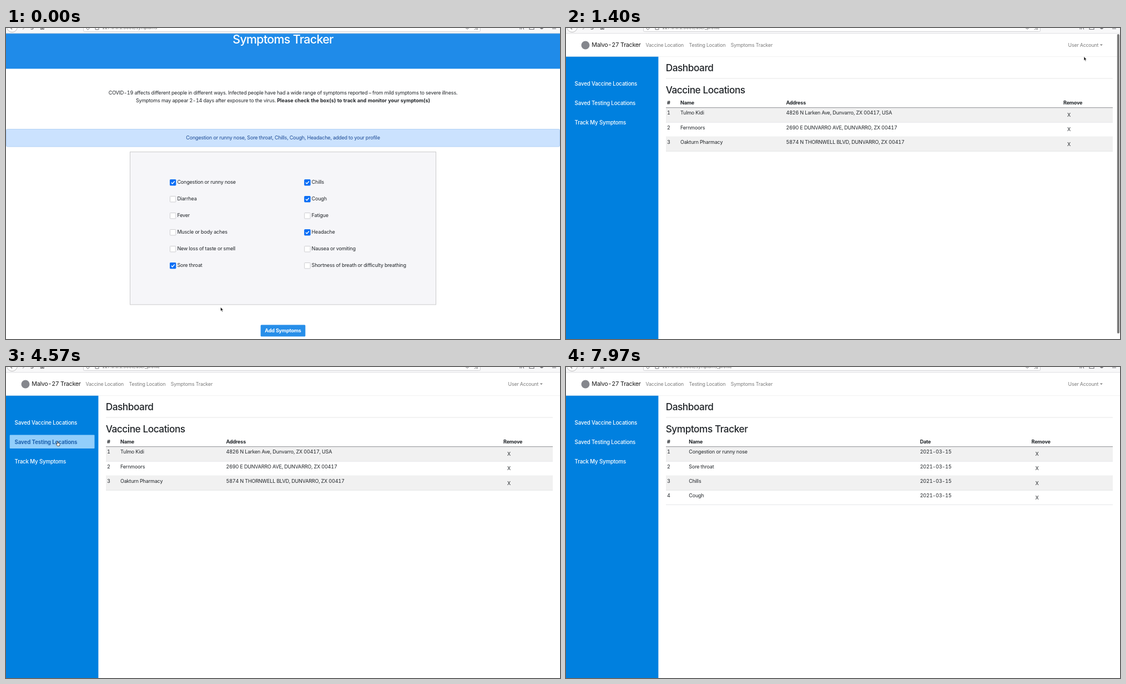
These frames come from a looping animation (998 by 561 pixels, 8640 ms). An HTML page:

```html
<!DOCTYPE html>
<html lang="en">
<head>
<meta charset="utf-8">
<title>Symptoms Tracker</title>
<style>
html, body { margin: 0; width: 100%; height: 100%; overflow: hidden; background: #fff; }
svg { display: block; width: 998px; height: 561px; }
text {
  font: 400 9px Inter, "Open Sans", sans-serif;
  font-optical-sizing: none;
  font-variant-numeric: tabular-nums;
  letter-spacing: -.019em;
  fill: #212529;
  white-space: pre;
}
.bold { font-weight: 700; }
tspan.bold { letter-spacing: 0; }
.mid { text-anchor: middle; }
.nav { font-size: 8.8px; fill: #7b7b7b; }
.brand { font-size: 10.8px; letter-spacing: -.03em; fill: #1b1b1b; }
.title { font-size: 21.4px; font-weight: 500; letter-spacing: -.032em; fill: #fff; }
.head { font-size: 17.3px; font-weight: 500; letter-spacing: -.028em; }
.side { font-size: 9.75px; font-weight: 500; fill: #fff; }
.soft .side { font-weight: 700; fill: #d5e8fa; }
.full .side { font-weight: 700; fill: #1d62b0; }
.row rect { fill: none; }
.soft rect { fill: #3195e6; }
.full rect { fill: #92cefb; }
.note { fill: #1b4a94; }
.white { fill: #fff; }
.url { font-size: 8px; fill: #666; }
</style>
</head>
<body>
<svg id="stage" viewBox="0 0 998 561"></svg>
<script>
const LOOP = 8640;
const stage = document.getElementById("stage");

function add(parent, tag, attrs, content) {
  const el = document.createElementNS("http://www.w3.org/2000/svg", tag);
  for (const k in attrs) el.setAttribute(k, attrs[k]);
  if (content) el.textContent = content;
  parent.append(el);
  return el;
}
const group = parent => add(parent, "g", {});
const rect = (p, x, y, width, height, fill, more) =>
  add(p, "rect", { x, y, width, height, fill, ...more });
const label = (p, x, y, str, cls = "") => add(p, "text", { x, y, class: cls }, str);
const line = (p, d, stroke, width = 1) =>
  add(p, "path", { d, stroke, "stroke-width": width, fill: "none" });
const show = (el, on) => { el.style.display = on ? "" : "none"; };

// Symptoms form
const form = group(stage);
rect(form, 0, 51, 998, 103.5, "#1f8be9");
label(form, 499, 109.2, "Symptoms Tracker", "title mid");
label(form, 499, 201.2, "COVID-19 affects different people in different ways. Infected people have had a wide range of symptoms reported – from mild symptoms to severe illness.", "mid");
const second = label(form, 499, 214.6, "Symptoms may appear 2-14 days after exposure to the virus. ", "mid");
add(second, "tspan", { class: "bold" }, "Please check the box(s) to track and monitor your symptom(s)");

const alertBox = group(form);
rect(alertBox, 0.5, 263.5, 997, 31.5, "#cbe2fe", { stroke: "#b3d2f5", rx: 2 });
label(alertBox, 499, 282.4, "Congestion or runny nose, Sore throat, Chills, Cough, Headache, added to your profile", "note mid");

const card = group(form);
rect(card, 223.5, 263.5, 551, 275.5, "#f6f6f9", { stroke: "#cacacc" });
const symptoms = [
  ["Congestion or runny nose", 1], ["Diarrhea"], ["Fever"], ["Muscle or body aches"],
  ["New loss of taste or smell"], ["Sore throat", 1],
  ["Chills", 1], ["Cough", 1], ["Fatigue"], ["Headache", 1],
  ["Nausea or vomiting"], ["Shortness of breath or difficulty breathing"]
];
symptoms.forEach(([name, on], i) => {
  const x = i < 6 ? 295 : 537.2, y = 313 + (i % 6) * 30;
  rect(card, x + .5, y + .5, 10.4, 10.4, on ? "#0d6ff5" : "#fff",
    { stroke: on ? "#0d6ff5" : "#cdcdd0", rx: .8 });
  if (on) line(card, `M${x + 2.8} ${y + 5.8}l2 2.1 3.9-4.4`, "#fff", 1.4);
  label(card, x + 13.4, y + 8, name);
});
rect(card, 458.7, 575.5, 80.6, 21, "#278ee9", { rx: 1.5 });
label(card, 499, 589.2, "Add Symptoms", "bold white mid");

// Dashboard
const dash = group(stage);
rect(dash, 0, 51.6, 166.4, 510, "#0080df");
label(dash, 179.7, 77.8, "Dashboard", "head");
line(dash, "M180 91H985", "#e6e6e6");

const sideRows = ["Saved Vaccine Locations", "Saved Testing Locations", "Track My Symptoms"]
  .map((name, i) => {
    const g = add(dash, "g", { class: "row" });
    rect(g, 6.7, 87.5 + i * 35.1, 152.8, 24.5, "none", { rx: 1 });
    label(g, 15.6, 103.6 + i * 35.1, name, "side");
    return g;
  });

function table(title, cols, heads, rows) {
  const g = group(dash);
  label(g, 179.7, 117.6, title, "head");
  heads.forEach((h, i) => label(g, cols[i], 138, h, "bold"));
  rows.forEach((cells, r) => {
    const y = 144 + r * 26.1;
    if (r % 2 === 0) rect(g, 180, y, 805, 26.1, "#f1f1f1");
    line(g, `M180 ${y + 26.2}H985`, "#dfe1e4", .8);
    [r + 1, ...cells].forEach((c, i) => label(g, cols[i], y + 12.4, c));
    label(g, cols[3] + 7, y + 16.3, "X");
  });
  line(g, "M180 143.6H985", "#a2a4a6", 1.2);
  return g;
}
const places = table("Vaccine Locations", [182, 206, 396.5, 896],
  ["#", "Name", "Address", "Remove"], [
    ["Tulmo Kidi", "4826 N Larken Ave, Dunvarro, ZX 00417, USA"],
    ["Fernmoors", "2690 E DUNVARRO AVE, DUNVARRO, ZX 00417"],
    ["Oakturn Pharmacy", "5874 N THORNWELL BLVD, DUNVARRO, ZX 00417"]
  ]);
const tracked = table("Symptoms Tracker", [182, 221.3, 637.7, 838.5],
  ["#", "Name", "Date", "Remove"],
  ["Congestion or runny nose", "Sore throat", "Chills", "Cough"].map(s => [s, "2021-03-15"]));

// Navigation bar
const nav = group(stage);
rect(nav, 0, 0, 998, 51.4, "#fff");
line(nav, "M0 51.6H998", "#000", .8).setAttribute("opacity", .08);
add(nav, "circle", { cx: 35, cy: 31, r: 7.5, fill: "#85878d" });
label(nav, 46.3, 34.4, "Malvo-27 Tracker", "brand");
label(nav, 143.6, 34, "Vaccine Location", "nav");
label(nav, 221.6, 34, "Testing Location", "nav");
label(nav, 296.8, 34, "Symptoms Tracker", "nav");
label(nav, 904.6, 34, "User Account", "nav");
add(nav, "path", { d: "M961.8 29.5h5l-2.5 2.6z", fill: "#7b7b7b" });

// Browser chrome, cut off by the top edge
const chrome = group(stage);
rect(chrome, 0, 0, 998, 9.5, "#f8f8f9");
line(chrome, "M0 9.8H998", "#d9d9db", .8);
rect(chrome, 139.5, -14, 715, 20.3, "#fff", { stroke: "#cfcfd2", rx: 2 });
add(chrome, "circle", { cx: 11, cy: -2, r: 9.5, fill: "#fff", stroke: "#b9b9bb" });
const ink = "#747478";
line(chrome, "M11 2.5l-3.5-3.5M44.5 1.5q2.5 1.8 5-1M62.5-2v4.5h2v-2h1.6v2h2V-2", ink, 1.2);
line(chrome, "M30 2.5l3.5-3.5", "#b5b5b8", 1.2);
line(chrome, "M144.8-1q.3 3 2.7 4.2q2.4-1.2 2.7-4.2M161-2v4.8h6V-2M828-.5q3 4.6 6 0M843.8 3l2.6-1.8L849 3V-2", ink, 1);
line(chrome, "M926-2v4.5M928.5-2v4.5M931-1l1.8 3.5M943-2v4.5h8V-2M962-.5q3 4.5 6 0M984 1.3h7", ink, 1.1);
add(chrome, "circle", { cx: 965, cy: 0, r: 1.8, fill: ink });
const url = label(chrome, 173, 1.8, "", "url");

const bar = rect(stage, 992.8, 11, 4.2, 540, "#7c7c7c", { rx: 2.1 });

// Pointers, tip at the origin
const arrow = add(stage, "path", {
  d: "M0 0V7.2L1.6 5.8 2.8 8.4 4 7.9 2.8 5.3H5Z",
  fill: "#111", stroke: "#fff", "stroke-width": .6
});
const hand = add(stage, "path", {
  d: "M-.8.6Q0-.5.8.6V3L3.2 3.6Q4.4 4 4 5.8L3.3 8.4H-.6L-2.8 5.3Q-2.6 4.2-.8 5.2Z",
  fill: "#fff", stroke: "#222", "stroke-width": .8
});

const VACCINE = 0, TESTING = 1, TRACK = 2;
// Each step: time, pointer x, pointer y, then what changes with it.
const steps = [
  [0, 386.5, 503.5, { page: "form", notice: true, scroll: 81, row: -1, tone: "full", bar: false }],
  [170, 720, 230, { scroll: 0 }],
  [330, 942, 39, { notice: false }],
  [570, 938, 32], [770, 936, 31], [970, 934, 41], [1170, 933, 50],
  [1400, 933, 51.5, { page: "places", bar: true }],
  [1570, 930, 56], [1800, 840, 100], [2000, 660, 190], [2200, 460, 280], [2400, 300, 330],
  [2570, 224, 338, { bar: false }],
  [2770, 134, 166, { row: TRACK, tone: "soft" }],
  [2970, 130, 166, { tone: "full" }],
  [3170, 112, 134, { row: TESTING }],
  [3370, 104, 100, { row: VACCINE }],
  [3570, 98, 103],
  [3770, 92, 132.5, { row: TESTING, bar: true }],
  [3970, 92, 133], [4170, 92.5, 133], [4370, 92.5, 133.5],
  [4570, 93, 134, { bar: false }],
  [4770, 93, 137],
  [4970, 94, 163, { row: TRACK }],
  [5170, 94, 165, { page: "tracked", tone: "soft", bar: true }],
  [5410, 94, 165, { tone: "full" }],
  [5570, 94, 165.5], [5770, 94.5, 165.5],
  [5970, 95, 165, { bar: false }],
  [6170, 95, 160], [6370, 96, 138, { row: TESTING }], [6570, 97, 128],
  [6770, 98, 106, { row: VACCINE }], [6970, 100, 104],
  [7410, 98, 101],
  [7970, -40, -40, { row: -1 }]
];
let carried = {};
const states = steps.map(([t, x, y, change]) => (carried = { ...carried, ...change, t, x, y }));

const paths = { form: "symptoms", places: "user_profile", tracked: "symptoms_profile" };
let current;

function draw(s) {
  show(form, s.page === "form");
  show(dash, s.page !== "form");
  show(places, s.page === "places");
  show(tracked, s.page === "tracked");
  show(alertBox, s.notice);
  show(bar, s.bar);
  const lift = `translate(0 ${-s.scroll})`;
  form.setAttribute("transform", lift);
  nav.setAttribute("transform", lift);
  card.setAttribute("transform", `translate(0 ${s.notice ? 41 : 0})`);
  url.textContent = "127.0.0.1:5000/" + paths[s.page];
  sideRows.forEach((g, i) => g.setAttribute("class", i === s.row ? "row " + s.tone : "row"));
  show(hand, s.row >= 0);
  show(arrow, s.row < 0);
  for (const p of [hand, arrow]) p.setAttribute("transform", `translate(${s.x} ${s.y})`);
}

function tick() {
  const t = performance.now() % LOOP;
  const next = states.findLast(s => s.t <= t);
  if (next !== current) draw(current = next);
  requestAnimationFrame(tick);
}
tick();
</script>
</body>
</html>
```
